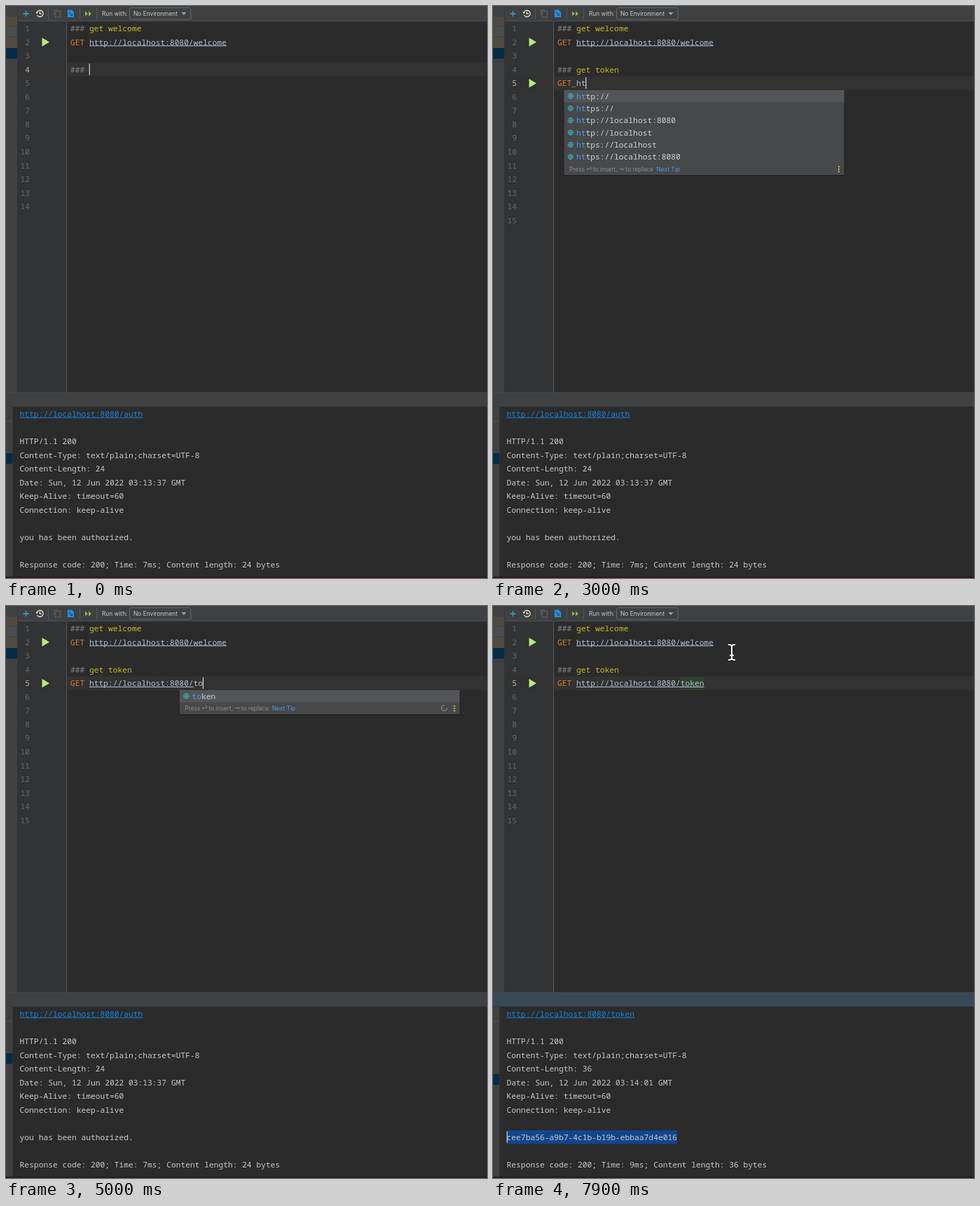
Write an HTML page that moves like this. It is 687 by 816 pixels and loops after 8000 ms.

```html
<!DOCTYPE html>
<html lang="en">
<head>
<meta charset="utf-8">
<style>
html, body { margin: 0; width: 100%; height: 100%; overflow: hidden; background: #2b2b2b; }
svg { display: block; }
text { white-space: pre; }
.mono { font: 500 11.27px "Noto Sans Mono", "DejaVu Sans Mono", monospace; }
.ui { font: 8.35px Inter, "DejaVu Sans", sans-serif; }
</style>
</head>
<body>
<svg id="stage" width="687" height="816" viewBox="0 0 687 816">
  <g id="frame"></g>
  <g id="scene"></g>
</svg>
<script>
const LOOP = 8000, CHAR = 6.762, PITCH = 19.55, LEFT = 92, CONSOLE_X = 19.6;
const COLOR = { text: '#b1bfce', grey: '#858585', yellow: '#c2bd22', orange: '#d67a2e',
  link: '#1683e0', match: '#4a9bea', plain: '#c8c8c8', panel: '#3e4042', navy: '#032c47', found: '#304131' };

const rect = (x, y, w, h, fill, extra = '') =>
  `<rect x="${x}" y="${y}" width="${w}" height="${h}" fill="${fill}" ${extra}/>`;
const path = (d, stroke, width = 1, fill = 'none') =>
  `<path d="${d}" stroke="${stroke}" stroke-width="${width}" fill="${fill}"/>`;
const label = (x, y, str, fill, cls = 'mono', extra = '') =>
  `<text class="${cls}" x="${x}" y="${y}" fill="${fill}" ${extra}>${str}</text>`;
const spans = (x, y, parts, extra = '') => label(x, y,
  parts.map(([str, fill]) => `<tspan fill="${fill}">${str}</tspan>`).join(''), COLOR.text, 'mono', extra);
const lineY = n => 32 + PITCH * (n - 1);
const col = n => LEFT + CHAR * n;
const underline = (x, y, chars, fill) => rect(x, y + 4.8, chars * CHAR, 1, fill);

// Latest value of a [time, value] list
const at = (steps, t) => steps.reduce((last, [time, value]) => t >= time ? value : last, steps[0][1]);

// One keystroke per entry of times, appended to base
const typed = (base, str, times) => times.map((time, i) => [time, base + str.slice(0, i + 1)]);

const TITLE = [[0, '### '],
  ...typed('### ', 'get', [300, 500, 700]),
  ...typed('### get', ' token', [1400, 1500, 1600, 1700, 1800, 1900])];
const HOST = 'http://localhost:8080';
const REQUEST = [[0, ''], [2200, 'G'], [2700, 'GET '],
  ...typed('GET ', 'http', [2900, 3000, 3100, 3200]),
  [4000, 'GET ' + HOST], [4300, 'GET ' + HOST + '/'],
  [4600, 'GET ' + HOST + '/t'], [4800, 'GET ' + HOST + '/to'], [5500, 'GET ' + HOST + '/token']];
const ADDRESSES = ['http://', 'https://', HOST, 'http://localhost', 'https://localhost', 'https://localhost:8080'];
const MOUSE = [[6500, 215, 560], [6800, 266, 764], [6900, 264, 764], [7200, 15, 764], [7400, 26, 762], [7800, 341, 66]];

function mouseAt(t) {
  const next = MOUSE.findIndex(([time]) => time > t);
  if (next < 0) return MOUSE[MOUSE.length - 1].slice(1);
  const [t0, x0, y0] = MOUSE[next - 1], [t1, x1, y1] = MOUSE[next];
  const p = (t - t0) / (t1 - t0), ease = p * p * (3 - 2 * p);
  return [x0 + (x1 - x0) * ease, y0 + (y1 - y0) * ease];
}

function frame() {
  const separators = [60.5, 105.5, 129.5].map(x => path(`M${x} 3V19`, '#555759')).join('');
  const strip = [[15, 14, '#4f493f'], [30, 14, '#4a4b4c'], [45, 15, '#514a3f'], [60, 15, COLOR.navy]]
    .map(([y, h, fill]) => rect(0, y, 16, h, fill)).join('');
  return rect(0, 0, 687, 816, '#2b2b2b') + rect(0, 0, 687, 21.5, COLOR.panel)
    + rect(0, 0, 16, 551, COLOR.panel) + strip
    + rect(17, 22, 69.5, 529, '#313335') + rect(16, 0, 1, 551, '#323435') + rect(17, 21, 670, 1, '#4b4d4f')
    + path('M28.5 7V15M24.5 11H32.5', '#2fabc8', 1.4)
    + path('M44.2 9.2A4.6 4.6 0 1 1 44.4 13M48.3 8V11.2H51', '#e6e2c4', 1.3) + path('M42.5 8.5H46L44 11.5Z', 'none', 0, '#e6e2c4')
    + path('M68.5 13V5.5H74.5M70.5 7.5H77.5V16H70.5Z', '#5d6062', 1.2)
    + path('M88 5.5H94L97 8.5V16H88Z', 'none', 0, '#1e8fe8') + path('M90 9L94 13M91.5 13.5H94.5V10.5', '#24506f', 1.1)
    + path('M113 7.5L117 11L113 14.5ZM118 7.5L122 11L118 14.5Z', 'none', 0, '#8fb84a') + separators
    + label(137, 13.7, 'Run with:', COLOR.plain, 'ui')
    + rect(176.5, 2.5, 87.5, 16.5, COLOR.panel, 'rx="2" stroke="#65686a"')
    + label(182, 13.7, 'No Environment', COLOR.plain, 'ui') + path('M250.5 9H257.5L254 13Z', 'none', 0, '#a0a3a5')
    + rect(0, 572, 9, 244, COLOR.panel) + rect(0, 592, 9, 1, '#515355') + rect(9, 572, 1, 244, '#323435')
    + rect(0, 814, 687, 2, '#28191f');
}

function popup(x, items, prefix, selected, footer, bold) {
  const row = 17.35, top = 120, textX = x + (bold ? 4 : 17.5), bottom = top + row * items.length;
  const baseY = bottom + 11.4;
  let out = rect(x - 1, top + 1, 402, bottom - top + 18, '#000', 'opacity=".2" rx="2"')
    + rect(x, top, 400, bottom - top + 17, '#46484a') + rect(x, top + row * selected, 400, row, '#525457');
  items.forEach((item, i) => {
    const y = top + 8.5 + row * i, cx = x + 9.3;
    if (!bold) out += path(`M${cx - 3.6} ${y}a3.6 3.6 0 1 0 7.2 0a3.6 3.6 0 1 0 -7.2 0H${cx + 3.6}`
      + `M${cx} ${y - 3.6}q-3 3.6 0 7.2q3 -3.6 0 -7.2`, '#39b7c5', 0.9);
    out += spans(textX, y + 4, [[item.slice(0, prefix), COLOR.match], [item.slice(prefix), '#cfd1d3']],
      bold ? 'style="font-weight:700"' : '');
  });
  footer.forEach(([dx, str, fill = '#8c8e90']) => out += label(x + dx, baseY, str, fill, 'ui'));
  for (const dy of [-3.5, 0, 3.5]) out += rect(x + 391.5, bottom + 7.7 + dy, 2, 2, '#e0b63a');
  return out;
}

const DOT_TIP = [[7.5, 'Press ^.to choose the selected (or first) suggestion and insert a dot afterwards'],
  [325, 'Next Tip', COLOR.match]];
const INSERT_TIP = [[7.5, 'Press'], [31.5, '⏎'], [41.5, 'to insert,'], [78, '⇥'], [88, 'to replace'],
  [132, 'Next Tip', COLOR.match]];

function popups(t) {
  if (t >= 2200 && t < 2700) return popup(88, ['GET', 'GRPC'], 1, 0, DOT_TIP, true);
  if (t >= 3000 && t < 4000) {
    const prefix = at(REQUEST, t).length - 4;
    return popup(101.5, ADDRESSES, prefix, at([[0, 0], [3800, 1], [3900, 2]], t), INSERT_TIP);
  }
  if (t >= 4700 && t < 5500) {
    const angle = Math.floor(Math.min(t, 5300) / 100) * 45;
    const spinner = t < 5000 ? '' : `<g transform="rotate(${angle} 626 145.5)">${path('M626 141.5a4 4 0 1 1 -4 4', '#8c8e90', 1.2)}</g>`;
    return popup(248, ['token'], at(REQUEST, t).length - 26, 0, INSERT_TIP) + spinner;
  }
  return '';
}

function editor(t) {
  const row = t < 2000 ? 4 : 5, lines = t < 2000 ? 14 : 15;
  const title = at(TITLE, t), request = at(REQUEST, t), url = request.slice(4), ready = t >= 2700;
  let out = rect(17, lineY(row) - 9.8, 670, PITCH, '#323232') + rect(86, 22, 1, 529, '#555759');
  for (let n = 1; n <= lines; n++)
    out += label(34, lineY(n) + 4, n, n === row ? '#b4b4b4' : '#666a6d', 'mono', 'text-anchor="end"');
  for (const n of ready ? [2, 5] : [2])
    out += path(`M51.5 ${lineY(n) - 6.2}L62 ${lineY(n)}L51.5 ${lineY(n) + 6.2}Z`, 'none', 0, '#b4ec7c');

  const mark = (n, from, chars) => rect(col(from), lineY(n) - 9.5, chars * CHAR, PITCH - 0.5, COLOR.found);
  if (t >= 4100 && t < 4300) out += mark(2, 11, 14) + mark(5, 11, 14);
  if (t >= 3400 && t < 4000) out += mark(5, 4, 4);
  if (t >= 5500) out += mark(5, 26, 5);

  out += spans(LEFT, lineY(1) + 4, [['### ', COLOR.grey], ['get welcome', COLOR.yellow]])
    + spans(LEFT, lineY(2) + 4, [['GET ', COLOR.orange], [HOST + '/welcome', COLOR.text]])
    + underline(col(4), lineY(2), 29, COLOR.text)
    + spans(LEFT, lineY(4) + 4, [['### ', COLOR.grey], [title.slice(4), ready ? COLOR.yellow : COLOR.grey]])
    + spans(LEFT, lineY(5) + 4, [[request.slice(0, 4), ready ? COLOR.orange : COLOR.text], [url, COLOR.text]]);
  if (t >= 4600) out += underline(col(4), lineY(5), t >= 5700 ? 27 : 22, COLOR.text);
  else if (ready) out += underline(col(3), lineY(5), 1, '#6f7a6b');

  const caretOn = t < 7000 && !(t >= 1100 && t < 1400);
  if (caretOn) out += rect(col(row === 4 ? title.length : request.length) - 0.4, lineY(row) - 8.5, 1.2, 16.5, '#d8d8d8');
  return out;
}

function response(t) {
  const fresh = t >= 6000, done = !fresh || t >= 6100;
  const url = HOST + (fresh ? '/token' : '/auth'), size = fresh ? 36 : 24;
  const y = i => 582 + PITCH * i;
  let out = rect(0, 551, 687, 21, t >= 7000 ? '#394857' : COLOR.panel) + rect(0, 551, 687, 1, '#47494b')
    + rect(0, 571, 687, 1, '#323435') + rect(0, t >= 6100 ? 668 : 638, 9, 15, COLOR.navy);
  out += label(CONSOLE_X, y(0) + 4, url, done ? COLOR.link : COLOR.plain);
  if (!done) return out;
  out += underline(CONSOLE_X, y(0), url.length, COLOR.link);

  if (t >= 6900) {
    const end = Math.round((mouseAt(t)[0] - CONSOLE_X) / CHAR);
    const from = t >= 7200 ? 0 : Math.max(0, Math.min(36, end)), x = CONSOLE_X + from * CHAR;
    out += rect(x, y(9) - 10, (36 - from) * CHAR, PITCH, '#11458c') + rect(x, y(9) - 8.5, 1.2, 16.5, '#d8d8d8');
  }
  ['HTTP/1.1 200', 'Content-Type: text/plain;charset=UTF-8', `Content-Length: ${size}`,
    `Date: Sun, 12 Jun 2022 ${fresh ? '03:14:01' : '03:13:37'} GMT`, 'Keep-Alive: timeout=60',
    'Connection: keep-alive', '', fresh ? 'cee7ba56-a9b7-4c1b-b19b-ebbaa7d4e016' : 'you has been authorized.', '',
    `Response code: 200; Time: ${fresh ? 9 : 7}ms; Content length: ${size} bytes`
  ].forEach((str, i) => out += label(CONSOLE_X, y(i + 2) + 4, str, COLOR.plain));
  return out;
}

function pointer(t) {
  if (t < MOUSE[0][0]) return '';
  const [x, y] = mouseAt(t);
  const beam = `M${x - 5} ${y - 11}Q${x} ${y - 11} ${x} ${y - 8}Q${x} ${y - 11} ${x + 5} ${y - 11}`
    + `M${x} ${y - 8}V${y + 8}M${x - 5} ${y + 11}Q${x} ${y + 11} ${x} ${y + 8}Q${x} ${y + 11} ${x + 5} ${y + 11}`
    + `M${x - 3} ${y + 4.5}H${x + 3}`;
  return path(beam, '#111', 4.2) + path(beam, '#fff', 2.2);
}

const scene = document.getElementById('scene');
document.getElementById('frame').innerHTML = frame();
let shown = '';

function render(t) {
  const markup = editor(t) + response(t) + popups(t) + pointer(t);
  if (markup !== shown) scene.innerHTML = shown = markup;
}

const start = performance.now();
function tick() {
  render((performance.now() - start) % LOOP);
  requestAnimationFrame(tick);
}
tick();
</script>
</body>
</html>
```
